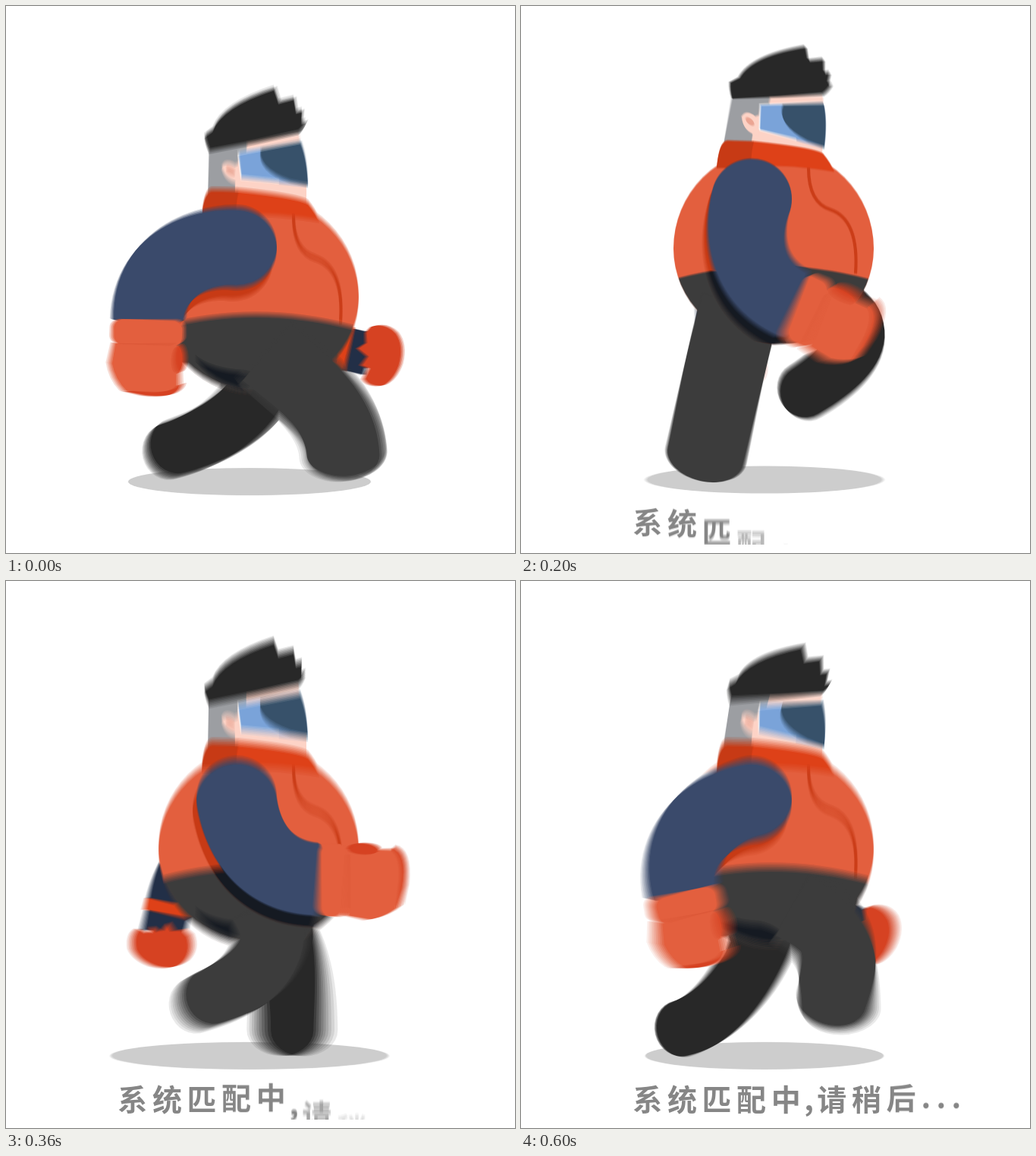
An HTML page with a canvas that plays this animation: 671x720 px, repeating every 0.64 s.

```html
<!DOCTYPE html>
<html lang="zh">
<head>
<meta charset="utf-8">
<title>Walk cycle</title>
<style>
  html, body { margin: 0; width: 100%; height: 100%; overflow: hidden; background: #fff; }
  canvas { display: block; }
</style>
</head>
<body>
<canvas id="stage" width="671" height="720"></canvas>
<script>
const LOOP = 640, HALF = LOOP / 2, STEP = 40, SHUTTER = 20, SAMPLES = 10;
const W = 671, H = 720;
const C = {
  shirt: '#e35f3e', red: '#de4118', deep: '#c73a15', farHand: '#d64222',
  sleeve: '#3a4a6b', navy: '#222f47', pants: '#3c3c3c', black: '#282828',
  shade: '#151a22', skin: '#fdd3c6', grey: '#9c9ea2', glass: '#7aa3d9',
  glassDark: '#37516a', ground: '#cdcdcd', text: '#868686'
};

const out = document.getElementById('stage').getContext('2d');
const layer = document.createElement('canvas');
layer.width = W;
layer.height = H;
const g = layer.getContext('2d');

// ---- Motion rules ----

const RAD = Math.PI / 180;
const wrap = (t, period = LOOP) => ((t % period) + period) % period;
const clamp01 = v => Math.max(0, Math.min(1, v));
const wave = (t, period = LOOP) => Math.cos(2 * Math.PI * t / period);
const ease = (t, from, to) => {
  const u = clamp01((t - from) / (to - from));
  return u * u * (3 - 2 * u);
};
// Angles run from straight down, positive towards the front.
const polar = (x, y, deg, len) => [x + Math.sin(deg * RAD) * len, y + Math.cos(deg * RAD) * len];
// 0 at each multiple of the period, 1 halfway between.
const triangle = (t, period) => 1 - Math.abs(1 - 2 * wrap(t, period) / period);

const bodyDrop = t => 72 * (1 - triangle(t, HALF)) ** 2.3 - 2;
const headNod = t => 11.5 * Math.max(0, Math.sin(Math.PI * (wrap(t, HALF) - 150) / 170)) - .5;
const groundWidth = t => 160.5 - 14 * wave(t) + 13.5 * wave(t, HALF);

function armSwing(t) {
  const u = triangle(t, LOOP);
  return -53 + 110 * (u + .06 * Math.sin(Math.PI * u));
}

// Ankle path through one stride: time, x, y.
const stride = [
  [0, 449, 590], [40, 376, 591], [120, 258, 592], [200, 244, 592], [280, 211, 589],
  [320, 218, 584], [360, 260, 552], [440, 364, 507], [520, 374, 507], [600, 414, 556]
];

// Smooth closed curve through rows of [time, ...values].
function along(keys, t) {
  const n = keys.length;
  const key = j => keys[(j + n) % n];
  const when = j => key(j)[0] + LOOP * Math.floor(j / n);
  let i = n - 1;
  while (keys[i][0] > t) i--;
  const [ta, tb, tc, td] = [-1, 0, 1, 2].map(d => when(i + d));
  const span = tc - tb, u = (t - tb) / span, u2 = u * u, u3 = u2 * u;
  return key(i).slice(1).map((b, k) => {
    const [a, c, d] = [-1, 1, 2].map(o => key(i + o)[k + 1]);
    const mb = (c - a) / (tc - ta) * span, mc = (d - b) / (td - tb) * span;
    return (2 * u3 - 3 * u2 + 1) * b + (u3 - 2 * u2 + u) * mb +
           (3 * u2 - 2 * u3) * c + (u3 - u2) * mc;
  });
}

// ---- Drawing helpers ----

// Tapered tube along a bezier, with elliptical ends.
function limb([ax, ay], [bx, by], [cx, cy], [dx, dy], w0, w1, startCap, endCap) {
  const path = new Path2D(), back = [], N = 28;
  for (let i = 0; i <= N; i++) {
    const u = i / N, v = 1 - u, w = w0 + (w1 - w0) * u;
    const point = (a, b, c, d) => v * v * v * a + 3 * v * v * u * b + 3 * v * u * u * c + u * u * u * d;
    const slope = (a, b, c, d) => v * v * (b - a) + 2 * v * u * (c - b) + u * u * (d - c);
    const x = point(ax, bx, cx, dx), y = point(ay, by, cy, dy);
    const tx = slope(ax, bx, cx, dx), ty = slope(ay, by, cy, dy), k = w / Math.hypot(tx, ty);
    path.lineTo(x + ty * k, y - tx * k);
    back.unshift([x - ty * k, y + tx * k]);
  }
  path.ellipse(dx, dy, endCap, w1, Math.atan2(dy - cy, dx - cx), -Math.PI / 2, Math.PI / 2);
  back.forEach(p => path.lineTo(...p));
  path.ellipse(ax, ay, startCap, w0, Math.atan2(by - ay, bx - ax), Math.PI / 2, Math.PI * 1.5);
  path.closePath();
  return path;
}

function fill(shape, color) {
  g.fillStyle = color;
  g.fill(typeof shape === 'string' ? new Path2D(shape) : shape);
}
function line(d, color, width) {
  g.strokeStyle = color;
  g.lineWidth = width;
  g.stroke(new Path2D(d));
}
function oval(x, y, rx, ry, color, turn = 0) {
  const p = new Path2D();
  p.ellipse(x, y, rx, ry, turn, 0, Math.PI * 2);
  fill(p, color);
}
function group(x, y, degrees, draw) {
  g.save();
  g.translate(x, y);
  g.rotate(degrees * RAD);
  draw();
  g.restore();
}

// ---- Figure ----

const torso = new Path2D();
torso.ellipse(333, 318, 132, 132, 0, Math.PI, Math.PI * 2);
torso.ellipse(333, 318, 132, 126, 0, 0, Math.PI);
const trousers = new Path2D('M190 360L208 357Q330 325 457 358L480 362V460H190Z');
const cuff = new Path2D();
cuff.roundRect(0, -48, 38, 96, 13);

function drawLeg(t, drop, hipX, width, color) {
  const foot = along(stride, t), lift = (592 - foot[1]) / 85;
  const bent = ease(t, 200, 290) - ease(t, 550, 620);
  const thigh = 27 + 43 * wave(t - 530);
  const shin = thigh / 4 - 8 - 68 * bent;
  const hip = [hipX + 44 * wave(t - 500), 391 + drop];
  fill(limb(hip, polar(...hip, thigh, 65), polar(...foot, shin, -60 - 35 * lift), foot,
    width, width + (37 - width) * bent, 0, 34), color);
}

function poseArm(x, y, swing, bend, reach, w0, w1) {
  const wrist = polar(x, y, swing, reach), aim = bend + .92 * swing;
  const elbow = polar(x, y, 1.05 * swing - 40, 55);
  return { wrist, angle: 90 - aim, path: limb([x, y], elbow, polar(...wrist, aim, -67), wrist, w0, w1, w0, 4) };
}

function drawFarArm(swing) {
  const arm = poseArm(325, 288, swing, 30, 155, 40, 29);
  fill(arm.path, C.navy);
  group(...arm.wrist, arm.angle, () => {
    g.scale(.94, .94);
    fill('M-6 -30H36V30H-6Z', C.navy);
    fill('M-9 -32H8V33H-9Z', C.red);
    fill('M24 -28L30 -38Q50 -50 68 -38Q84 -24 83 4Q80 28 66 38Q46 46 36 36L40 20L28 18L34 4L18 -4L28 -14Z', C.farHand);
  });
}

function drawTorso() {
  fill(torso, C.shirt);
  line('M379 212Q379 258 408 267Q446 280 441 351', '#cb3d18', 4);
  g.save();
  g.clip(torso);
  fill(trousers, C.pants);
  g.restore();
  fill('M249 398Q272 416 315 418Q342 424 350 442Q280 442 249 398Z', C.shade);
}

function drawArmShade(path) {
  const shade = new Path2D();
  shade.addPath(path, { e: -5, f: 14 });
  g.save();
  g.clip(torso);
  fill(shade, C.deep);
  g.clip(trousers);
  fill(shade, C.shade);
  g.restore();
}

function drawHead(degrees) {
  group(306, 190, degrees, () => {
    g.translate(-306, -190);
    fill('M298 118L386 104L396 165V195H298Z', C.skin);
    fill('M268 116L318 110L317 126L306 128V142L290 150L302 168V190H266Z', C.grey);
    fill('M284 147Q288 137 300 143L310 150V169Q289 168 284 147Z', C.skin);
    oval(296, 152, 7, 3.5, '#eba593', .6);
    fill('M306 128L388 113Q397 135 398 171L310 161Z', C.glass);
    fill('M336 123L388 113Q397 135 398 171L375 166Q330 150 336 123Z', C.glassDark);
    line('M389 113L306 128L310 161L360 166', '#fff', 1.5);
    fill('M262 105L273 97Q285 65 354 43L360 61L380 56L383 74L391 72L390 88L396 86Q392 97 386 102L330 114L268 126Q263 115 262 105Z', C.black);
  });
}

function drawCollar() {
  fill('M258 212Q261 177 272 176L307 177Q385 185 398 193Q408 205 413 217Q340 205 303 212Z', C.red);
  fill('M258 212Q261 177 272 176L307 177Q303 190 303 212Z', C.deep);
}

function drawHand({ wrist, angle }, swing) {
  group(...wrist, angle, () => {
    g.scale(.95 + .09 * Math.sin(swing * RAD), 1);
    oval(58, -42, 21, 8, C.farHand);
    fill('M96 -47Q119 -42 114 5L108 32Q102 0 96 -47Z', C.farHand);
    fill('M34 -41L96 -43Q108 -36 109 -8L107 32Q90 47 66 51L36 46Z', C.shirt);
    oval(58, -41, 19, 6, C.farHand);
    fill(cuff, C.shirt);
    line('M37 -34V36', '#dc5838', 1);
  });
}

// ---- Caption ----

const advance = ch => ch === ',' ? 15 : ch === '.' ? 20 : 45.6;
let edge = 144;
const caption = [...'系统匹配中,请稍后...'].map((ch, i) => {
  const x = edge + advance(ch) / 2;
  edge += advance(ch);
  return { ch, x, start: 48 * Math.min(i, 9) };
});

// Letters ease up, overshoot by three pixels, then settle.
const rise = age => 50 * (1 - clamp01(age / 150)) ** 1.3 -
  3 * Math.sin(Math.PI * clamp01((age - 130) / 110));

function drawCaption(t) {
  g.save();
  g.beginPath();
  g.rect(0, 0, W, 709);
  g.clip();
  g.font = '700 39px "Noto Sans CJK SC", "Noto Sans CJK", sans-serif';
  g.textAlign = 'center';
  g.fillStyle = C.text;
  for (const { ch, x, start } of caption) {
    const age = t - start;
    g.globalAlpha = clamp01(age / 100);
    g.fillText(ch, x, 697 + rise(age));
  }
  g.restore();
}

// ---- Scene ----

function drawScene(t) {
  const drop = bodyDrop(t), swing = armSwing(t);
  const arm = poseArm(304, 253, swing, 46, 150, 53, 48);
  const inBody = draw => group(0, drop, 0, draw);

  g.fillStyle = '#fff';
  g.fillRect(0, 0, W, H);
  oval(321, 623.5 + drop * .04, groundWidth(t), 18, C.ground);
  drawLeg(wrap(t + HALF), drop, 353, 44, C.black);
  inBody(() => {
    drawFarArm(-swing);
    drawTorso();
  });
  drawLeg(wrap(t), drop, 333, 53, C.pants);
  inBody(() => {
    drawArmShade(arm.path);
    drawHead(headNod(t));
    drawCollar();
    fill(arm.path, C.sleeve);
    drawHand(arm, swing);
  });
  drawCaption(t);
}

// Averages several moments around t to give motion blur.
function render(t) {
  for (let i = 0; i < SAMPLES; i++) {
    drawScene(t + SHUTTER * ((i + .5) / SAMPLES - .5));
    out.globalAlpha = 1 / (i + 1);
    out.drawImage(layer, 0, 0);
  }
}

const start = performance.now();
let shown = -1;
function tick() {
  const t = Math.floor((performance.now() - start) % LOOP / STEP) * STEP;
  if (t !== shown) render(shown = t);
  requestAnimationFrame(tick);
}
tick();
</script>
</body>
</html>
```
